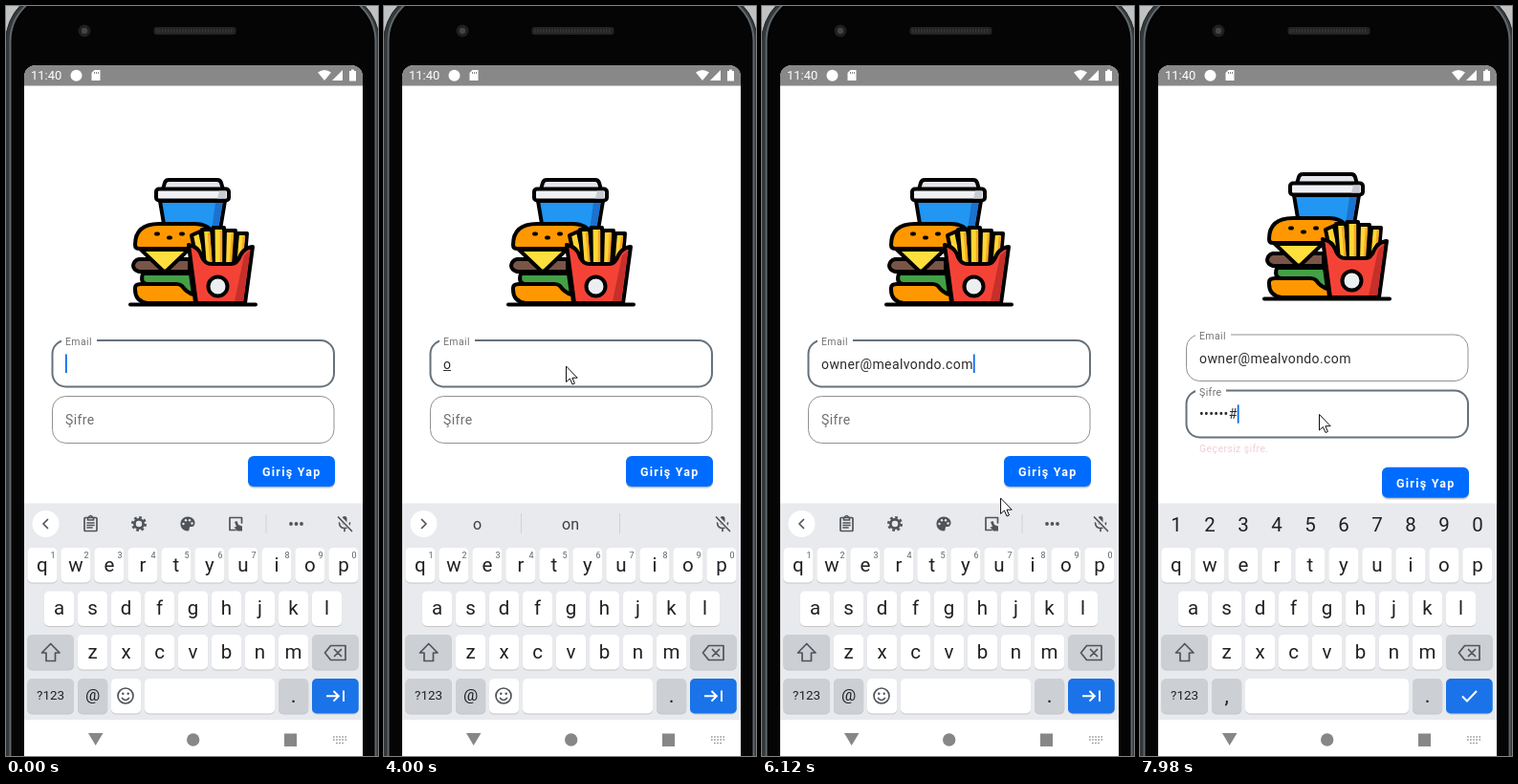
These frames come from a looping animation (389x785 px, 8000 ms). An HTML page:

```html
<!DOCTYPE html>
<html lang="tr">
<head>
<meta charset="utf-8">
<style>
html, body { margin: 0; width: 100%; height: 100%; overflow: hidden; background: #000; }
svg { display: block; width: 389px; height: 785px; font-family: Roboto, sans-serif; }
.ink { stroke: #000; stroke-width: 4; stroke-linejoin: round; stroke-linecap: round; }
.icon { fill: none; stroke: #505459; stroke-width: 1.7; stroke-linejoin: round; stroke-linecap: round; }
.mid { text-anchor: middle; }
.field { fill: none; }
.text { font-size: 14px; letter-spacing: .4px; fill: #2b2b2b; white-space: pre; }
.small { font-size: 10.5px; letter-spacing: .4px; }
</style>
</head>
<body>
<svg viewBox="0 0 389 785" xmlns="http://www.w3.org/2000/svg">
  <defs>
    <clipPath id="screen"><rect x="19" y="62" width="354" height="760" rx="12"/></clipPath>
  </defs>

  <!-- phone -->
  <rect width="389" height="785" fill="#bfc1c3"/>
  <rect x="-.5" y="-18" width="391" height="900" rx="56" fill="#33383b" stroke="#24282a"/>
  <rect x="4.500" y="-14" width="382" height="900" rx="51" fill="#000" stroke="#60676b" stroke-width="2"/>
  <rect x="7" y="-11" width="377" height="900" rx="49" fill="#050505"/>
  <circle cx="82" cy="26" r="6.500" fill="#202022"/>
  <circle cx="82" cy="26" r="3.200" fill="#434348"/>
  <rect x="154.500" y="22" width="86" height="8" rx="3" fill="#242424"/>
  <path d="M157 26H238" stroke="#343434" stroke-width="4" stroke-dasharray="1.500 1.500"/>

  <g clip-path="url(#screen)">
    <rect x="19" y="62" width="354" height="723" fill="#fff"/>
    <rect x="19" y="62" width="354" height="21.500" fill="#888"/>
    <g fill="#fff">
      <text x="26" y="77.300" font-size="13">11:40</text>
      <circle cx="73.500" cy="72.700" r="6"/>
      <path d="M92.500 67H98.500V78H89.500V70Z"/>
      <path d="M326 69.500Q333 64.500 340 69.500L333 78Z"/>
      <path d="M341 78L352 67V78Z"/>
      <path d="M359 68H361V66.500H364V68H366V78.500H359Z"/>
    </g>
    <path d="M92.500 69V71M94.500 69V71M96.500 69V71" stroke="#888"/>

    <g id="upper">
      <!-- cup -->
      <g class="ink">
        <path d="M161 204L167 240H223L229 204Z" fill="#2196f3"/>
        <path d="M219 206H226.500L222 235H215Z" fill="#1b72cf" stroke="none"/>
        <path d="M164 192L166 185Q167 182 170 182H221Q224 182 225 185L227 192Z" fill="#e5e6ec"/>
        <rect x="157" y="191.500" width="76" height="12" rx="3" fill="#f0f1f5"/>
        <path d="M223 193.500H230V201.500H221Z" fill="#c9cbd4" stroke="none"/>
      </g>
      <!-- burger -->
      <g class="ink">
        <path d="M135 250Q135 228 160 228H197Q213 228 217 240V254H139Q135 254 135 250Z" fill="#ff9800"/>
        <path d="M157 238.500H159M170 242.500H172M183 238.500H185"/>
        <path d="M141 291H196L198 311H148Q135 309 135 297V295Q135 291 141 291Z" fill="#ff9800"/>
        <path d="M143 280H193L196 302Q189 300 184 293Q182 291 178 291H147Q140 290 143 280Z" fill="#43a047"/>
        <path d="M139 265H192V278H139Q133 276 133 271.500Q134 266 139 265Z" fill="#795548"/>
        <path d="M141 255H191L168 277Q166 278 164 277Z" fill="#ffdf3d"/>
      </g>
      <!-- fries -->
      <g class="ink" fill="#ffd633">
        <path d="M194 240L203 236L211 274H201Z"/>
        <path d="M242 238H252L249 274H239Z"/>
        <path d="M205 234H215L218 274H208Z"/>
        <path d="M229 235H240L237 274H228Z"/>
        <path d="M216.500 232H228V274H217Z"/>
      </g>
      <path d="M212 237L214.500 268M225 235V268M237 238L235 268M249 241L247 262" stroke="#f5a623" stroke-width="2.500"/>
      <g class="ink">
        <path d="M191 250Q202 252 205 263Q208 270 215 270H235Q242 270 245 261Q249 253 258 252L250 311H199Z" fill="#f44336"/>
        <path d="M249 261L255 256L248 309H239Z" fill="#c62f2a" stroke="none"/>
        <circle cx="221.500" cy="293.500" r="10" fill="#eceff1"/>
        <path d="M130 312.500H261"/>
      </g>

      <rect id="mailBox" class="field" x="48.500" y="350" width="294.500" height="48.500" rx="14"/>
      <rect x="58" y="346" width="37" height="8" fill="#fff"/>
      <text class="small" x="62" y="354.600" fill="#747474">Email</text>
      <text id="mail" class="text" x="62" y="380"></text>
      <path id="under" stroke="#333"/>

      <rect id="passBox" class="field" x="48.500" y="408.500" width="294.500" height="49" rx="14"/>
      <rect id="notch" x="58" y="404" width="32" height="9" fill="#fff"/>
      <text id="passLabel" x="62" letter-spacing=".4">Şifre</text>
      <text id="pass" class="text" x="62" y="438"></text>
      <g id="error">
        <text class="small" x="62" y="473" fill="#b00020">Geçersiz şifre.</text>
        <g id="alert" stroke="#b00020" stroke-width="1.600" fill="none">
          <circle cx="322" cy="433" r="7.500"/>
          <path d="M322 429V434M322 436V437.500"/>
        </g>
      </g>
      <rect id="caret" width="1.800" height="19.500" fill="#0a6cf0"/>
    </g>

    <g id="button">
      <rect x="253" y="473" width="91" height="32" rx="6" fill="#000" opacity=".13"/>
      <rect x="253" y="472" width="91" height="32" rx="6" fill="#000" opacity=".15"/>
      <rect x="253" y="471" width="91" height="32" rx="6" fill="#006cff"/>
      <text x="268" y="492" font-size="12.500" font-weight="600" letter-spacing="1.250" fill="#fff">Giriş Yap</text>
    </g>

    <!-- keyboard -->
    <rect x="19" y="520.500" width="354" height="227" fill="#e8eaed"/>
    <g id="keys"></g>
    <g id="bar">
      <rect id="press" x="247" y="524" width="91" height="36" rx="4" fill="#d3d6da"/>
      <circle cx="41.500" cy="542" r="14" fill="#fff"/>
      <path id="chevron" class="icon"/>
      <g id="tools">
        <g class="icon">
          <rect x="82" y="535.500" width="13" height="14" rx="1"/>
          <path d="M85.500 536V538H91.500V536M85 541H92M85 543.500H92M85 546H90M86.500 535Q88.500 532 90.500 535"/>
          <circle cx="139" cy="542" r="4.600" stroke-width="2.700"/>
          <circle cx="139" cy="542" r="6.700" stroke-width="2.600" stroke-dasharray="2.700 2.560" stroke-linecap="butt"/>
          <path d="M240 548.500H234V535.500H246.500V541"/>
        </g>
        <path d="M239 540L241.500 539L243 543L247 544.500V549.500H242L238.500 545.500L241 545Z" fill="#505459"/>
        <path d="M190 534.500C180 535 180 549 190 549.500C193 549 190.500 545.500 193 545H195C199 544 199 535 190 534.500Z" fill="#505459"/>
        <g fill="#e8eaed"><circle cx="185.500" cy="542" r="1.200"/><circle cx="188" cy="538.300" r="1.200"/><circle cx="192" cy="538.300" r="1.200"/><circle cx="194.500" cy="541.500" r="1.200"/></g>
        <path d="M272 532V552" stroke="#cfd1d5"/>
        <g fill="#505459"><circle cx="298" cy="542" r="1.900"/><circle cx="303.500" cy="542" r="1.900"/><circle cx="309" cy="542" r="1.900"/></g>
      </g>
      <g id="words" class="mid" fill="#3c4043">
        <path d="M143.500 531V552M246.500 531V552" stroke="#cfd1d5"/>
        <g font-size="16"><text id="word1" x="97.500" y="548"></text><text id="word2" x="195" y="548"></text></g>
        <g id="offers">
          <g font-size="12.300" font-weight="500"><text x="195" y="535.500">owner</text><text x="291.500" y="535.500">owner</text></g>
          <g font-size="10.700"><text x="195" y="550">@bundorvell.com</text><text x="291.500" y="550" font-size="10">@mealvondo.com</text></g>
        </g>
      </g>
      <g>
        <rect x="351.500" y="534" width="5" height="9" rx="2.500" fill="#505459"/>
        <path class="icon" d="M348.500 541Q349 546.500 354 546.500Q359 546.500 359.500 541M354 547V549.500"/>
        <path d="M348 534.500L362 549" stroke="#e8eaed" stroke-width="4"/>
        <path class="icon" d="M347.500 535L361.500 549.500"/>
      </g>
    </g>
    <g id="digits" class="mid" font-size="20.500" fill="#202124"></g>

    <!-- navigation -->
    <rect x="19" y="747.500" width="354" height="38" fill="#fff"/>
    <g fill="#878787">
      <path d="M86 761H101.500L93.700 774Z"/>
      <circle cx="195.700" cy="768" r="6.700"/>
      <rect x="291" y="761.500" width="13" height="13.500"/>
    </g>
    <path d="M342 765H356.500M342 768H356.500M345 771.500H353" stroke="#999" stroke-width="1.600" stroke-dasharray="1.700 1.400"/>
  </g>
  <path id="mouse" d="M0 0V16.500L3.900 13L6.500 19L8.900 18L6.400 12.200H11.700Z" fill="#fff" stroke="#111"/>
</svg>
<script>
const $ = id => document.getElementById(id);
const LOOP = 8000;
const ADDRESS = 'owner@mealvondo.com';
const SECRET = '123456#';
const KEYS_AT = [6650, 6720, 6860, 7120, 7320, 7380, 7910];

const clamp = v => Math.max(0, Math.min(1, v));
const ease = v => v * v * (3 - 2 * v);
const show = (id, on) => $(id).setAttribute('display', on ? 'inline' : 'none');
const set = (id, attrs) => { for (const k in attrs) $(id).setAttribute(k, attrs[k]); };
const within = (t, spans) => spans.some(([a, b]) => t >= a && t < b);

function key(x, y, w, fill, label = '', size = 20.5, cls = '') {
  const mid = x + w / 2;
  return `<rect x="${x}" y="${y + 1}" width="${w}" height="36.5" rx="5" fill="#c3c5c9"/>` +
    `<rect x="${x}" y="${y}" width="${w}" height="36.5" rx="5" fill="${fill}"/>` +
    `<text class="mid ${cls}" x="${mid}" y="${y + 17.5 + size * .35}" font-size="${size}" fill="#202124">${label}</text>`;
}

function buildKeys() {
  const grey = '#cccfd4', white = '#fff', low = 704;
  let s = '', hints = '', digits = '';
  [['qwertyuiop', 22.3, 567], ['asdfghjkl', 39.9, 612.5], ['zxcvbnm', 74.9, 658]].forEach(([row, x, y]) => {
    [...row].forEach((c, i) => s += key(x + i * 35, y, 31.2, white, c, 20.5, 'letter'));
  });
  for (let i = 0; i < 10; i++) {
    const n = (i + 1) % 10;
    hints += `<text x="${49 + i * 35}" y="577.5" font-size="9">${n}</text>`;
    digits += `<text x="${38 + i * 35}" y="550">${n}</text>`;
  }
  s += key(22.3, 658, 48.7, grey) + key(320, 658, 48.7, grey);
  s += key(22.3, low, 48.7, grey, '?123', 13.5);
  s += key(285, low, 31.2, grey, '.', 22) + key(320, low, 48.7, '#1a73e8');
  s += `<g id="mailKeys">${key(75, low, 31.2, grey, '@', 17)}${key(110, low, 31.2, white)}${key(145, low, 136, white)}
    <g class="mid" fill="#5f6368">${hints}</g>
    <g class="icon"><circle cx="125" cy="722" r="8"/><path d="M121.500 724.500Q125 728.500 128.500 724.500"/></g>
    <g fill="#505459"><circle cx="122.300" cy="719.700" r="1.200"/><circle cx="127.700" cy="719.700" r="1.200"/></g>
    <path d="M335 722.300H347.500M342.500 717L347.800 722.300L342.500 727.600M353 716.500V728" fill="none" stroke="#fff" stroke-width="2"/></g>`;
  s += `<g id="passKeys">${key(75, low, 31.2, grey, ',', 22)}${key(110, low, 171, white)}
    <path d="M337 722.500L342 727.500L352 717" fill="none" stroke="#fff" stroke-width="2"/></g>`;
  s += `<path id="shift" class="icon" d="M46.700 667.500L56 677H51.500V685.500H42V677H37.500Z"/>
    <path class="icon" d="M339.500 669.500H355V684.500H339.500L333.500 677ZM343.500 673.500L350.500 680.500M350.500 673.500L343.500 680.500"/>`;
  $('keys').innerHTML = s;
  $('digits').innerHTML = digits;
}

// [start, end, from x, from y, to x, to y]
const MOVES = [
  [60, 460, 292, 672, 164, 378],
  [2200, 2600, 164, 378, 190.5, 377],
  [5460, 5860, 190.5, 377, 268, 541],
  [6000, 6390, 268, 541, 187.5, 427.5]
];

function mouse(t) {
  const m = MOVES.filter(m => t >= m[0]).pop();
  show('mouse', !!m);
  if (!m) return;
  const p = ease(clamp((t - m[0]) / (m[1] - m[0])));
  set('mouse', { transform: `translate(${m[2] + (m[4] - m[2]) * p} ${m[3] + (m[5] - m[3]) * p})` });
}

function outline(id, focus, color) {
  set(id, { stroke: color || (focus ? '#65717c' : '#919191'), 'stroke-width': focus ? 2 : 1 });
}

function draw(t) {
  const onPass = t >= 6520;
  const count = KEYS_AT.filter(k => t >= k).length;
  const bad = t >= 6650 && t < 7910;
  const moved = t >= 6650;

  // email
  const typed = t < 3470 ? '' : t < 4670 ? 'o' : t < 6000 ? 'ow' : ADDRESS;
  $('mail').textContent = typed;
  const mailEnd = 62 + (typed ? $('mail').getComputedTextLength() : 0);
  set('under', { d: typed && t < 6000 ? `M62 381.500H${mailEnd - .4}` : '' });
  outline('mailBox', !onPass);

  // password
  const masked = count ? '•'.repeat(count - 1) + SECRET[count - 1] : '';
  $('pass').textContent = masked;
  const passEnd = 62 + (masked ? $('pass').getComputedTextLength() : 0);
  const lift = ease(clamp((t - 6455) / 130));
  set('passLabel', { y: 438 - 23.8 * lift, 'font-size': 14 - 3.5 * lift, fill: bad ? '#b00020' : '#6f6f6f' });
  show('notch', lift > 0);
  outline('passBox', onPass, bad && '#b00020');
  set('error', { opacity: bad ? clamp((t - 6600) / 200) : moved ? clamp((8000 - t) / 100) : 0 });
  set('alert', { opacity: bad ? 1 : clamp((7970 - t) / 60) });
  set('upper', { transform: `translate(0 ${moved ? -6 : 0})` });
  set('button', { transform: `translate(0 ${moved ? 11.7 : 0})` });

  // caret
  show('caret', within(t, [[0, 470], [1010, 1470], [2010, 2470], [3000, 3800], [4530, 5730], [6000, LOOP]]));
  set('caret', onPass ? { x: passEnd, y: 423.3 } : { x: mailEnd, y: 364.5 });

  // suggestion strip
  const strip = t >= 3670 && t < 6060;
  const offers = t >= 5260;
  show('bar', !onPass);
  show('digits', onPass);
  show('tools', t < 3800 || t >= 6060);
  set('tools', { opacity: strip ? 1 - clamp((t - 3600) / 200) : 1 });
  show('words', strip && t >= 3800);
  show('offers', offers);
  show('press', t >= 5860 && t < 6060);
  $('word1').textContent = t < 4000 ? '' : t < 4670 ? 'o' : 'ow';
  $('word2').textContent = t < 4000 || offers ? '' : t < 4730 ? 'on' : 'own';
  set('chevron', { d: strip ? 'M39.500 537.500L44 542L39.500 546.500' : 'M43.500 537.500L39 542L43.500 546.500' });

  // keys
  show('mailKeys', !onPass);
  show('passKeys', onPass);
  const upper = t >= 7840 && t < 7910;
  $('shift').style.fill = upper ? '#505459' : 'none';
  for (const el of letters) {
    const c = el.textContent;
    el.textContent = upper ? c.toUpperCase() : c.toLowerCase();
  }
  mouse(t);
}

buildKeys();
const letters = document.querySelectorAll('.letter');
const start = performance.now();
function tick() {
  draw((performance.now() - start) % LOOP);
  requestAnimationFrame(tick);
}
tick();
</script>
</body>
</html>
```
